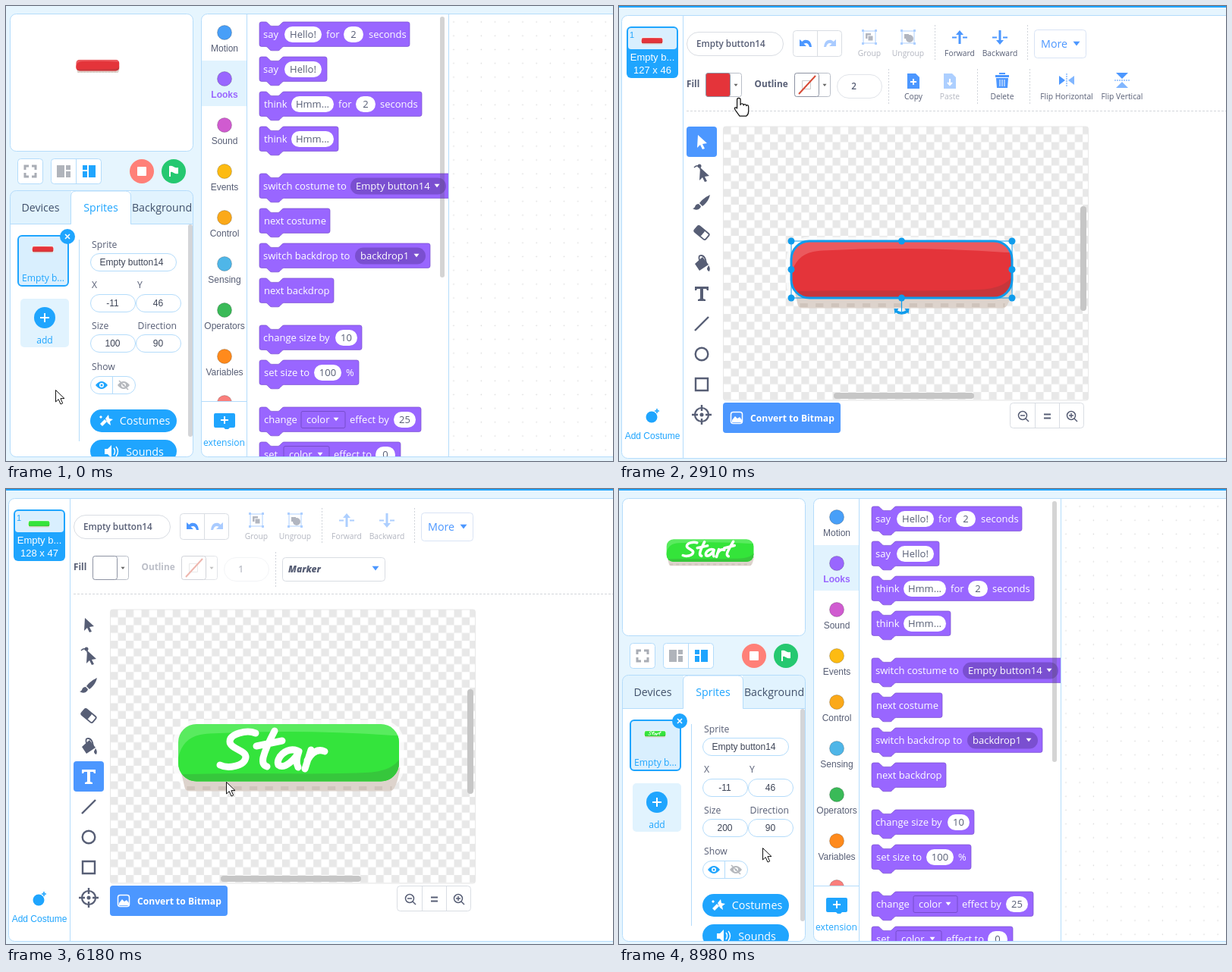
An HTML page that plays this animation: 800 px wide and 600 px high, repeating every 9.06 s.

```html
<!DOCTYPE html>
<html lang="en">
<head>
<meta charset="utf-8">
<title>Start button</title>
<style>
html,body{margin:0;width:100%;height:100%;overflow:hidden;background:#e6f5fe}
svg{display:block;width:800px;height:600px}
text{font-family:"Open Sans","Noto Sans",sans-serif;white-space:pre}
.a{font-family:"Liberation Sans",Arial,sans-serif}
.c{text-anchor:middle}
.m{fill:var(--m)}.l{fill:var(--l)}.d{fill:var(--d)}
.word{fill:none;stroke:#fff;stroke-width:9;stroke-linecap:round;stroke-linejoin:round}
</style>
</head>
<body>
<svg id="root" viewBox="0 0 800 600" xmlns="http://www.w3.org/2000/svg"></svg>
<script>
const LOOP = 9060, BLUE = '#1fa5fe', PALE = '#e1f3fe', LINE = '#b4dcfb', INK = '#575e75', ACC = '#4c97ff';
const root = document.getElementById('root');
const $ = id => document.getElementById(id);

// ---------- drawing helpers ----------
const rect = (x, y, w, h, r, fill, extra = '') =>
  `<rect x="${x}" y="${y}" width="${w}" height="${h}" rx="${r}" fill="${fill}" ${extra}/>`;
const box = (x, y, w, h, r, stroke = LINE, fill = '#fff') =>
  rect(x + .5, y + .5, w, h, r, fill, `stroke="${stroke}"`);
const circ = (x, y, r, fill, extra = '') => `<circle cx="${x}" cy="${y}" r="${r}" fill="${fill}" ${extra}/>`;
const path = (d, fill, extra = '') => `<path d="${d}" fill="${fill}" ${extra}/>`;
const line = (d, stroke, w = 1, extra = '') =>
  `<path d="${d}" fill="none" stroke="${stroke}" stroke-width="${w}" ${extra}/>`;
const text = (x, y, s, size, fill, cls = '', extra = '') =>
  `<text x="${x}" y="${y}" font-size="${size}" fill="${fill}" class="${cls}" ${extra}>${s}</text>`;
const group = (id, body, extra = '') => `<g id="${id}" ${extra}>${body}</g>`;
const at = (x, y, body, s = 1) => `<g transform="translate(${x} ${y}) scale(${s})">${body}</g>`;
const caret = (x, y, fill, s = 3.5) => path(`M${x - s} ${y - s / 2}h${2 * s}l${-s} ${s * 1.3}z`, fill);
const art = (id, x, y, s) =>
  `<g id="${id}" transform="translate(${x} ${y}) scale(${s})"><use href="#art"/><use href="#word" class="w"/></g>`;

const letters = [
  'M582 322C570 317 548 323 548 333C548 343 570 344 569 354C567 366 545 369 535 364',
  'M607 319Q595 342 592 354Q590 364 597 366M583 339L617 332',
  'M637 345C622 340 608 355 612 364C620 370 635 356 639 346Q634 360 638 367',
  'M655 344L647 369M650 358C656 347 664 342 673 346',
  'M703 318Q688 342 683 355Q680 365 687 367M673 340L707 331'
];
const word = 'translate(-625.5 -347.5)';

const TILE = 10.3;
const stops = list => list.map(([o, c, id]) => `<stop offset="${o}" stop-color="${c}" ${id ? `id="${id}"` : ''}/>`).join('');
const hues = Array.from({length: 7}, (_, i) => [i / 6, `hsl(${i * 60} 100% 55%)`]);
const defs = `<defs>
<linearGradient id="gh">${stops(hues)}</linearGradient>
<linearGradient id="gs">${stops([[0, '#e3e3e3'], [1, '#f00', 'satEnd']])}</linearGradient>
<linearGradient id="gb">${stops([[0, '#000'], [1, '#f00', 'briEnd']])}</linearGradient>
<pattern id="check" width="${2 * TILE}" height="${2 * TILE}" patternUnits="userSpaceOnUse" x="638.5" y="${352.6 - TILE}">
${rect(0, 0, 2 * TILE, 2 * TILE, 0, '#fff')}${path(`M0 0h${TILE}v${2 * TILE}h${TILE}v${-TILE}h${-2 * TILE}z`, '#e8e8e8')}</pattern>
<pattern id="dots" width="18.2" height="18.2" patternUnits="userSpaceOnUse" x="581" y="12">${circ(9, 9, .8, '#dcdcdc')}</pattern>
<clipPath id="cBlocks"><rect x="318" y="11" width="265" height="583"/></clipPath>
<clipPath id="cCats"><rect x="258" y="11" width="60" height="510"/></clipPath>
<clipPath id="cPanel"><rect x="5" y="244" width="242" height="350" rx="8"/></clipPath>
<clipPath id="cArt"><rect x="-145.5" y="-37.5" width="291" height="75.5" rx="24"/></clipPath>
<g id="art">
${rect(-152, -43, 304, 92, 30, '#fff', 'opacity=".75"')}
${path('M-143 20L-137 46Q-136 51 -130 51H134Q142 50 147 20z', '#ddd3cc')}
${line('M-134 47H136', '#c7bbb3', 5, `stroke-dasharray="${TILE} ${TILE}" opacity=".6"`)}
<g clip-path="url(#cArt)"><rect class="l" x="-146" y="-38" width="292" height="77"/>
<path class="m" d="M-146 10C-142 -14 -128 -24 -104 -25Q20 -31 146 -22V38H-146z"/>
<path class="d" d="M-146 29C-60 26 50 30 110 26Q136 23 146 9V40H-146z"/></g></g>
<g id="word" class="word" transform="${word}">${line(letters.join(''), '#fff', 9)}</g>
</defs>`;

// ---------- left column ----------
const eye = (x, y, c) => path(`M${x - 8} ${y}Q${x} ${y - 10} ${x + 8} ${y}Q${x} ${y + 10} ${x - 8} ${y}z`, c) +
  circ(x, y, 3, '#fff') + circ(x, y, 1.5, c);
const label = (x, y, s) => text(x, y, s, 12.2, '#575e75');
const field = (x, y, w, s, id) => box(x, y, w, 23, 11.5) +
  text(x + w / 2 - (w > 80 ? 2 : 0), y + 16, s, 12, '#3d4456', 'a c', id ? `id="${id}"` : '');
const left = box(5, 10, 241, 181, 8) + art('onStage', 120.8, 78, .196) +
  box(15, 201, 33, 33, 4) + line('M25 216v-5h5M34 211h5v5M39 220v5h-5M30 225h-5v-5', '#a9adb5', 3) +
  box(59, 201, 66, 33, 4) + line('M92.5 202v32', LINE) +
  path('M67 210h10v16h-10zM79 210h6v6h-6zM79 218h6v8h-6z', '#b0b4bb') +
  path('M101 210h6v6h-6zM101 218h6v8h-6zM109 210h9v16h-9z', BLUE) +
  circ(179, 218, 16, '#ff8078') + rect(173, 212, 12, 12, 1, '#fff') +
  circ(221, 218, 16, '#25c870') + path('M215 211q3-1 6 1t6 1v8q-3 1-6-1t-4-1v6h-2z', '#fff') +
  `<g clip-path="url(#cPanel)">` + rect(5, 244, 242, 351, 8, '#fff') +
  path('M5 244H86V288H5zM164 244H247V288H164z', PALE) +
  line('M5 287.5H85.5V251q0-7 7-7h65q7 0 7 7v36.5H247', LINE) +
  text(45.5, 271, 'Devices', 14.2, '#40506a', 'c') + text(125, 271, 'Sprites', 14.2, BLUE, 'c') +
  text(205.5, 271, 'Background', 14.2, '#40506a', 'c') +
  rect(16, 303, 66, 66, 5, '#d9effe', `stroke="${BLUE}" stroke-width="2"`) +
  art('thumbA', 48.5, 320.5, .096) + text(49, 363, 'Empty b...', 12.1, BLUE, 'c') +
  circ(81, 304, 10, BLUE) + line('M78 301l6 6M84 301l-6 6', '#fff', 1.6) +
  rect(19, 386, 64, 64, 5, PALE) + circ(51, 411, 14, BLUE) + line('M45 411h12M51 405v12', '#fff', 2) +
  text(51, 445, 'add', 12.1, BLUE, 'c') +
  line('M96.5 308V574', LINE) +
  label(113, 319, 'Sprite') + field(111, 326, 113, 'Empty button14') +
  label(113, 372, 'X') + label(173, 372, 'Y') + field(111, 380, 59, '-11') + field(171, 380, 59, '46') +
  label(113, 426, 'Size') + label(173.5, 426, 'Direction') +
  field(111, 433, 59, '100', 'size') + rect(130, 437, 21, 16, 0, '#3390ff', 'id="sizeSel" opacity=".4"') + field(171, 433, 59, '90') +
  label(113, 480, 'Show') + box(111, 488, 59, 23, 11.5) + line('M140.5 489v23', LINE) +
  eye(126, 500, BLUE) + eye(155, 500, '#b5b8bd') + line('M149 494l12 12', '#b5b8bd', 1.6) +
  rect(111, 532, 114, 30, 15, BLUE, 'id="cosBtn"') +
  group('cosLabel', path('M124 551l6-6 3 3-6 6zM131 544l4-5 1 5 5 1-4 3 1 5-4-3zM125 540l2 2-2 2-2-2z', '#fff') +
    text(183, 552, 'Costumes', 14.3, '#fff', 'c')) +
  group('cosX', line('M163 542l10 10M173 542l-10 10', '#fff', 2)) +
  circ(167, 549, 12, '#c8d45a', 'id="ripple" opacity=".75"') +
  rect(111, 572, 114, 30, 15, BLUE) + path('M130 584h4l5-5v17l-5-5h-4z', '#fff') +
  line('M142 583q3 4 0 9M145 581q5 6 0 13', '#fff', 1.4) + text(183, 593, 'Sounds', 14.3, '#fff', 'c') +
  rect(240, 288, 6, 280, 3, '#d3d5d8') + '</g>' + rect(5.5, 243.5, 241, 351, 8, 'none', `stroke="${LINE}"`);

// ---------- block palette ----------
const cats = [['Motion', '#489ff8'], ['Looks', '#9966ff'], ['Sound', '#d05bd0'], ['Events', '#fdbb12'], ['Control', '#fba919'],
  ['Sensing', '#4fb6e8'], ['Operators', '#3aba58'], ['Variables', '#ff8a1c'], ['', '#fa7f7c']];
const white = (x, w, s) => p => rect(x, p + 6, w, 21, 10.5, '#fff') + text(x + w / 2, p + 21, s, 13, INK, 'c');
const say = (x, s) => p => text(x, p + 21, s, 13, '#fff');
const drop = (x, w, s, r = 11) => p =>
  rect(x, p + 5.5, w, 22, r, r > 5 ? '#7a4fd0' : '#9966ff', r > 5 ? '' : 'stroke="#774dcb"') +
  text(x + 7, p + 21, s, 13, '#fff') + caret(x + w - 12, p + 15.5, '#fff');
const blocks = [
  [21, 198, say(339, 'say'), white(367, 49, 'Hello!'), say(422, 'for'), white(445, 26, '2'), say(478, 'seconds')],
  [67, 89, say(339, 'say'), white(367, 49, 'Hello!')],
  [113, 214, say(340, 'think'), white(376, 56, 'Hmm...'), say(438, 'for'), white(461, 26, '2'), say(493, 'seconds')],
  [159, 104, say(340, 'think'), white(376, 56, 'Hmm...')],
  [221, 255, say(339, 'switch costume to'), drop(454, 126, 'Empty button14')],
  [267, 93, say(340, 'next costume')],
  [313, 225, say(339, 'switch backdrop to'), drop(460, 93, 'backdrop1')],
  [359, 98, say(340, 'next backdrop')],
  [421, 135, say(339, 'change size by'), white(434, 29, '10')],
  [467, 131, say(340, 'set size to'), white(406, 36, '100'), say(448, '%')],
  [529, 213, say(340, 'change'), drop(389, 58, 'color', 2), say(453, 'effect by'), white(511, 29, '25')],
  [575, 186, say(340, 'set'), drop(366, 60, 'color', 2), say(432, 'effect to'), white(487, 26, '0')]
];
const shape = (x, y, w) => {
  const W = w / .675;
  return `<g transform="translate(${x} ${y}) scale(.675)">` + path(`M0 4A4 4 0 0 1 4 0H12c2 0 3 1 4 2l4 4c1 1 2 2 4 2h12c2 0 3-1 4-2l4-4c1-1 2-2 4-2
H${W - 4}a4 4 0 0 1 4 4v40a4 4 0 0 1-4 4H48c-2 0-3 1-4 2l-4 4c-1 1-2 2-4 2H24c-2 0-3-1-4-2l-4-4c-1-1-2-2-4-2H4a4 4 0 0 1-4-4z`,
    '#9966ff', 'stroke="#774dcb"') + '</g>';
};
const palette = box(257, 10, 900, 584, 8) + rect(584, 11, 216, 583, 0, 'url(#dots)') +
  rect(258, 72, 59, 60, 0, PALE) + '<g clip-path="url(#cCats)">' +
  cats.map(([n, c], i) => circ(288, 35 + 61 * i, 9.5, c, 'stroke="#000" stroke-opacity=".2"') +
    text(288, 60 + 61 * i, n, 12, i == 1 ? '#9966ff' : INK, 'a c', i == 1 ? 'font-weight="700"' : '')).join('') + '</g>' +
  line('M317.5 11V594M258 521.5H317M583.5 11V594', LINE) +
  path('M276 537h24q2 0 2 2v15q0 2-2 2h-5l-2 2h-4l-2-2h-11q-2 0-2-2v-15q0-2 2-2z', BLUE) +
  line('M283 546h10M288 541v10', '#fff', 2) + text(287.5, 580, 'extension', 12.1, BLUE, 'c') +
  '<g clip-path="url(#cBlocks)">' +
  blocks.map(([y, w, ...parts]) => shape(334, y, w) + parts.map(f => f(y)).join('')).join('') +
  rect(572, 14, 6, 344, 3, '#555', 'opacity=".25"') + '</g>';

// ---------- costume editor ----------
const note = (x, y, s) => text(x, y, s, 10.3, INK, 'c');
const vline = (x, y) => line(`M${x} ${y}v46`, '#d0d4da', 1, 'stroke-dasharray="2 2"');
const groupIcon = (x, ungroup) => `<g opacity=".45">` +
  line(`M${x - 8} 31h16v16h-16z`, ACC) + [[-10, 29], [7, 29], [-10, 46], [7, 46]].map(([a, b]) => rect(x + a, b, 3, 3, 0, ACC)).join('') +
  (ungroup ? circ(x + 2, 41, 5, INK) + rect(x - 5, 35, 6, 6, 0, INK)
    : rect(x - 5, 34, 7, 7, 0, INK) + rect(x - 2, 37, 7, 7, 0, INK, 'stroke="#fff"')) +
  note(x, 64, ungroup ? 'Ungroup' : 'Group') + '</g>';
const order = (x, s, id, up) => group(id, path(up ? `M${x} 30l5 6h-3.5v12h-3v-12h-3.5z` : `M${x} 49l5-6h-3.5v-13h-3v13h-3.5z`, ACC) +
  line(`M${x - 10} 39.5h6M${x + 4} 39.5h6`, ACC, 2) + note(x, 64, s));
const sheet = (x, glyph) => path(`M${x - 8} 87h11l5 5v15h-16z`, ACC) + line(glyph, '#fff', 2);
const swatch = (x, id, c) => box(x, 86, 47, 31, 3, '#b9bec8') + rect(x + .5, 86.5, 32, 31, 3, c, `id="${id}" stroke="#8d93a3"`) +
  caret(x + 40, 102, '#666', 2.5);
const undo = (x, s, c) => `<g transform="translate(${x} 48) scale(${s} 1)">` +
  path('M-8-6v9h9l-3.5-3.2Q3-3 5 4h3Q7-6-1-5.2-3-5-4.7-3z', c) + '</g>';
const lens = (x, d) => circ(x, 538, 5.5, 'none', `stroke="${INK}" stroke-width="1.5"`) +
  line(`M${x + 4} 542l4 4${d}`, INK, 1.5);
const pointer = 'M-5-9L7 2L1 3L4 9L1 10L-2 4L-6 8z';
const tools = [
  path(pointer, INK, 'id="tool0"'),
  path(pointer, INK, 'transform="translate(3 3)"') + circ(-3, -8, 2.5, INK) + line('M-10-6Q-4-12-1-2', INK, 1.5),
  path('M11-10Q2-6-3 1l4 4Q9-1 11-10zM-4 2q-4 0-5 4-1 2-3 2 4 3 8 1 3-2 3-4z', INK),
  `<g transform="rotate(40)">` + rect(-9.5, -5, 19, 10, 2, 'none', `stroke="${INK}" stroke-width="1.8"`) + rect(-9, -5, 11, 10, 2, INK) + '</g>',
  path('M-9 1L1-8L9 2L-3 10zM9 3q3 4 1 8-3-1-3-4z', INK) + line('M-3-4q-2-7 3-6t6 10', INK, 1.8),
  path('M-9-9H9V-4H7L6-6H2V7L5 8V10H-5V8L-2 7V-6H-6L-7-4H-9z', INK, 'id="tool5"'),
  line('M-9 9L9-9', INK, 2.4), circ(0, 0, 8.3, 'none', `stroke="${INK}" stroke-width="2.4"`),
  line('M-8-8H8V8H-8z', INK, 2.4),
  circ(0, 0, 9, 'none', `stroke="${INK}" stroke-width="2.2"`) + circ(0, 0, 2.5, INK) + line('M0-13V-5M0 13V5M-13 0H-5M13 0H5', INK, 2.4)
];
const handles = (x, y, w, h, s) => line(`M${x} ${y}h${w}v${h}h${-w}z`, '#0f9cec', s) +
  line(`M${x + w / 2} ${y + h}v18`, '#0f9cec', 1.2) +
  line(`M${x + w / 2 - 8} ${y + h + 17}q8 6 16 0`, '#0f9cec', 3.5) +
  path(`M${x + w / 2 - 10} ${y + h + 14}h6l-5 7zM${x + w / 2 + 10} ${y + h + 14}h-6l5 7z`, '#0f9cec') +
  [0, .5, 1].flatMap(a => [0, .5, 1].map(b => a == .5 && b == .5 ? '' : circ(x + w * a, y + h * b, 4.5, '#0f9cec'))).join('');
const slider = (y, name, id, fill) => text(51, y - 22, name, 9.5, INK, '', 'font-weight="600"') +
  text(51 + name.length * 5.5 + 12, y - 22, '', 9.5, INK, '', `id="${id}Val"`) +
  rect(51, y - 11, 150, 22, 11, `url(#${fill})`) + circ(0, y, 13, '#fff', `id="${id}Dot" stroke="#ccc"`);
const popup = rect(36, 165, 184, 279, 5, '#000', 'opacity=".08"') + box(38, 165, 179, 275, 4, '#ddd') +
  rect(74, 178, 20, 20, 4, ACC) + [[107, ACC], [140, '#aaa'], [167, '#ccc']].map(([x, c]) => circ(x, 188, 8, c)).join('') +
  line('M51 206.5H201', '#e3e3e3') + slider(249, 'Hue', 'hue', 'gh') + slider(314, 'Saturation', 'sat', 'gs') +
  slider(379, 'Brightness', 'bri', 'gb') + box(51, 402, 25, 25, 3, '#ddd') + line('M54 425L74 405', '#e5603b', 2) +
  line('M180 422l10-10M187 408l6 6M190 411l4-4', INK, 2);

const editor = box(257, 10, 1000, 584, 8) + line('M338.5 11V594', LINE) +
  rect(264, 25, 68, 68, 6, BLUE) + rect(266, 27, 64, 28, 4, '#d9effe') + text(268, 40, '1', 11, BLUE, 'a') +
  art('thumbB', 297.5, 43.5, .096) + text(298, 70, 'Empty b...', 13, '#fff', 'a c') + text(298, 87, '', 13, '#fff', 'a c', 'id="dim"') +
  circ(297, 540, 7.5, BLUE) + line('M301 532h6M304 529v6', BLUE, 1.6) + text(298, 569, 'Add Costume', 12, BLUE, 'a c') +
  box(343, 32, 127, 31, 15.5, '#d9dde3') + text(356, 52, 'Empty button14', 11.7, INK, '', 'font-weight="600"') +
  box(483, 30, 64, 34, 4, '#d9dde3') + line('M515.5 31v34', '#d9dde3') + undo(500, 1, ACC) + undo(532, -1, '#a9cbff') +
  groupIcon(584, 0) + groupIcon(635, 1) + vline(670.5, 23) + order(703, 'Forward', 'fwd', 1) + order(756, 'Backward', 'bwd', 0) + vline(792.5, 23) +
  box(801, 29, 68, 37, 4, '#d9e3f5') + text(810, 53, 'More', 14.3, ACC) + caret(857, 47, ACC, 4.5) +
  text(343, 105, 'Fill', 11.8, INK, '', 'font-weight="700"') + swatch(368, 'fill', '#9966ff') +
  group('outline', text(432.5, 105, 'Outline', 11.8, INK, '', 'font-weight="700"') + swatch(485, 'stroke', '#000') +
    rect(494, 96, 12, 12, 0, '#fff', 'id="solid"') +
    group('none', line('M495.5 96.5h11v11h-11z', '#ccc') + line('M491 114L513 90', '#d64a35', 2)) +
    box(541, 88, 59, 31, 15.5, '#e1e4e9') + text(563.5, 108, '', 11.7, INK, 'c', 'id="width" font-weight="600"')) +
  vline(609.5, 81) +
  group('actions', sheet(642, 'M638 98h8M642 94v8') + note(642, 121, 'Copy') +
    `<g opacity=".45">${sheet(690, 'M690 94v8M687 99l3 3 3-3')}${note(690, 121, 'Paste')}</g>` + vline(726.5, 81) +
    path('M750 89h18v3h-18zM755 86h8v2h-8zM751 93h16l-1 13h-14z', ACC) + line('M756 95v9M759 95v9M762 95v9', '#fff') +
    note(759, 121, 'Delete') + vline(795.5, 81) +
    path('M834 90v12l8-6z', ACC) + path('M854 90v12l-8-6z', ACC, 'opacity=".7"') + line('M844 87v18', ACC, 1, 'stroke-dasharray="2 1"') + note(844, 121, 'Flip Horizontal') +
    path('M909 86h16l-8 8z', ACC) + path('M909 106h16l-8-8z', ACC, 'opacity=".7"') + line('M907 96h20', ACC, 1, 'stroke-dasharray="2 1"') + note(917, 121, 'Flip Vertical')) +
  group('fonts', box(618, 88, 135, 31, 4, '#d9dde3') + text(626, 108, '', 12, INK, '', 'id="font"') + caret(741, 102, ACC, 4.5)) +
  line('M343 136.5H1150', '#d3d6db', 1, 'stroke-dasharray="3 2"') +
  rect(343, 157, 40, 40, 4, ACC, 'id="pick"') +
  tools.map((s, i) => at(363, 177 + 40 * i, s)).join('') +
  rect(391.5, 157, 481, 361, 3, 'url(#check)', 'stroke="#e8e8e8"') +
  `<g id="big" transform="translate(626.5 345.5)"><use href="#art"/><g class="word" transform="${word}">` +
  letters.map((d, i) => line(d, '#fff', 9, `id="ch${i}"`)).join('') + '</g></g>' +
  rect(481, 308, 291, 75, 24, 'none', 'id="glow" stroke="#0f9cec" stroke-width="3"') +
  group('selBody', handles(481, 308, 291, 75, 1)) + group('selText', handles(529, 311, 171, 71, 2)) +
  rect(537, 508, 185, 8, 4, '#c6c6c6') + rect(862, 262, 8, 138, 4, '#c6c6c6') +
  rect(391, 521, 155, 40, 4, ACC) + rect(401.5, 533.5, 15, 15, 3, 'none', 'stroke="#fff" stroke-width="1.5"') +
  path('M403 547v-3l4-5 3 3 3-2 3 4v3z', '#fff') + text(427, 546, 'Convert to Bitmap', 12.1, '#fff', '', 'font-weight="700"') +
  box(769, 521, 97, 33, 4, '#d9dde3') + line('M802.5 522v33M834.5 522v33', '#d9dde3') +
  lens(786, 'M783 538h6') + lens(850, 'M847 538h6M850 535v6') + line('M814 536.5h9M814 541.5h9', INK, 2) +
  group('tip', rect(366, 410, 31, 19, 0, '#000', 'opacity=".2"') + box(363, 406, 31, 18, 0, '#aaa') + text(378.5, 420, 'text', 11, '#777', 'c')) +
  `<g id="popup" transform="translate(254 -2)">${popup}</g>`;

const cursor = group('arrow', path('M.5.5V16l3.7-3.4L7 19l2.7-1.2-2.8-6.2H12z', '#fff', 'stroke="#111" stroke-linejoin="round"')) +
  group('hand', path('M-2 2q0-2 2-2t2 2v6q0-1.5 1.8-1.5t1.8 2q0-1.2 1.6-1.2t1.7 1.8q.2-1 1.3-1t1.3 2v5q0 4-2.5 6h-8q-2-3-5-7-2-3 .5-3 1 0 1.5 1z',
    '#fff', 'stroke="#111" stroke-width="1.1" stroke-linejoin="round" transform="scale(1.12)"'));

root.innerHTML = defs + rect(0, 0, 800, 600, 0, '#e6f5fe') + group('left', left) + group('palette', palette) +
  group('editor', editor) + rect(0, 0, 800, 2, 0, BLUE, 'id="bar"') + group('cursor', cursor);

// ---------- timing ----------
// Bursts of change: first step, last step, count
const bursts = [[0, 0, 1], [150, 610, 6], [930, 930, 1], [1160, 1160, 1], [1340, 1720, 5], [1970, 1970, 1], [2190, 3000, 10],
  [3100, 3390, 4], [3570, 3950, 5], [4230, 4610, 5], [4980, 5340, 5], [5540, 6180, 8], [6460, 6460, 1],
  [7180, 7880, 9], [8240, 8410, 3], [8810, 8980, 3]];
const snap = t => {
  const [a, b, n] = bursts.filter(s => s[0] <= t).pop();
  if (n == 1) return a;
  const gap = (b - a) / (n - 1);
  return a + gap * Math.min(n - 1, Math.floor((t - a) / gap));
};
// time, x, y, shape (0 arrow, 1 hand)
const moves = [[0, 65, 506, 0], [60, 65, 506, 0], [600, 166, 552, 1], [1245, 166, 552, 1], [1620, 363, 468, 1], [1715, 330, 300, 0],
  [1970, 350, 335, 0], [2180, 350, 335, 0], [2905, 158, 122, 1], [3000, 155, 112, 1], [3095, 62, 247, 1], [3385, 105, 247, 1],
  [3480, 105, 247, 0], [3660, 285, 225, 0], [4140, 285, 225, 0], [4605, 123, 311, 0], [4975, 110, 384, 1], [5345, 110, 384, 1],
  [5540, 400, 105, 1], [5630, 400, 105, 0], [5720, 290, 386, 0], [6460, 290, 386, 0], [7175, 167, 553, 1], [7265, 167, 553, 1],
  [7875, 141, 440, 0], [8155, 141, 440, 0], [8405, 189, 473, 0], [LOOP, 189, 473, 0]];
const place = t => {
  const i = Math.max(1, moves.findIndex(m => m[0] > t));
  const [a, b] = [moves[i - 1], moves[i]], k = (t - a[0]) / (b[0] - a[0]);
  return [a[1] + (b[1] - a[1]) * k, a[2] + (b[2] - a[2]) * k, a[3]];
};
const hsv = (h, s, v) => {
  const f = n => { const k = (n + h / 60) % 6; return Math.round(255 * v * (1 - s * Math.max(0, Math.min(k, 4 - k, 1)))); };
  return `rgb(${f(5)},${f(3)},${f(1)})`;
};
const show = (id, on) => $(id).style.display = on ? '' : 'none';
const set = (id, k, v) => $(id).setAttribute(k, v);
const write = (id, s) => { if ($(id).textContent !== s) $(id).textContent = s; };
const paint = (id, hue) => {
  const s = $(id).style;
  s.setProperty('--m', hsv(hue, .77, .895));
  s.setProperty('--l', hsv(hue, .62, .92));
  s.setProperty('--d', hsv(hue, .73, .78));
};

function draw(time) {
  const t = snap(Math.min(time + 8, LOOP - 1));
  const between = (a, b) => t >= a - 8 && t < b - 8;
  const wide = between(1720, 7180), late = t >= 7180, edit = between(1160, 7260);
  const shift = late ? 'translate(-1 2)' : '';
  show('left', !wide);
  show('palette', !edit);
  show('editor', edit);
  show('bar', t >= 1712);
  set('left', 'transform', shift);
  set('palette', 'transform', shift);
  set('editor', 'transform', wide ? 'translate(-254 2)' : shift);

  // colours of the drawn button
  const drag = Math.max(0, Math.min(1, (t - 3000) / 390)), hue = 34 * drag;
  const deg = t < 3000 ? 358 : hue * 3.6, changed = t >= 3660, done = t >= 6460;
  paint('big', deg);
  for (const id of ['onStage', 'thumbA', 'thumbB']) {
    paint(id, changed ? 122 : 358);
    $(id).querySelector('.w').style.display = done ? '' : 'none';
  }
  set('onStage', 'transform', t >= 8972 ? 'translate(121 79) scale(.395)' : 'translate(120.8 78) scale(.196)');
  write('dim', changed ? '128 x 47' : '127 x 46');

  // sprite panel
  const press = between(930, 1160) || between(7180, 7260);
  set('cosBtn', 'fill', press ? '#4bb9fe' : between(600, 1720) ? '#1d9bee' : BLUE);
  show('ripple', press);
  show('cosLabel', !edit);
  show('cosX', edit);
  write('size', t < 8810 ? '100' : t < 8890 ? '2' : t < 8970 ? '20' : '200');
  show('sizeSel', between(8240, 8810));

  // editor
  const picked = between(2190, 3570), typing = t >= 5065, tool = t >= 5540;
  show('glow', between(1970, 3570));
  show('selBody', picked);
  show('selText', done);
  set('fwd', 'opacity', picked ? 1 : .45);
  set('bwd', 'opacity', picked || done ? 1 : .45);
  set('fill', 'fill', typing ? '#fff' : t < 2190 ? '#9966ff' : hsv(deg, .77, .895));
  set('stroke', 'fill', t < 2190 ? '#000' : '#fff');
  show('solid', t < 2190);
  show('none', t >= 2190);
  set('outline', 'opacity', typing ? .4 : 1);
  write('width', t < 2190 ? '4' : typing ? '1' : '2');
  show('actions', !typing);
  show('fonts', typing);
  const marker = t >= 5625;
  write('font', marker ? 'Marker' : 'Sans Serif');
  set('font', 'font-style', marker ? 'italic' : 'normal');
  set('font', 'font-weight', marker ? 800 : 400);
  set('pick', 'y', tool ? 357 : 157);
  set('tool0', 'fill', tool ? INK : '#fff');
  set('tool5', 'fill', tool ? '#fff' : INK);
  letters.forEach((_, i) => show('ch' + i, i < 4 ? t >= 5900 + 91 * i : done));
  show('tip', between(4980, 5070));

  // colour picker
  const open = t < 3570 ? +(t >= 3000) : Math.max(0, .65 - (t - 3570) / 290);
  show('popup', open > 0);
  set('popup', 'opacity', open);
  for (const [id, v] of [['hue', hue], ['sat', 77], ['bri', 89]]) {
    set(id + 'Dot', 'cx', 62 + 1.265 * v);
    write(id + 'Val', String(Math.round(v)));
  }
  set('satEnd', 'stop-color', hsv(deg, 1, .89));
  set('briEnd', 'stop-color', hsv(deg, .77, 1));

  const [x, y, kind] = place(t);
  set('cursor', 'transform', `translate(${x} ${y})`);
  show('arrow', !kind);
  show('hand', kind);
}

const start = performance.now();
function tick() {
  draw((performance.now() - start) % LOOP);
  requestAnimationFrame(tick);
}
tick();
</script>
</body>
</html>
```
